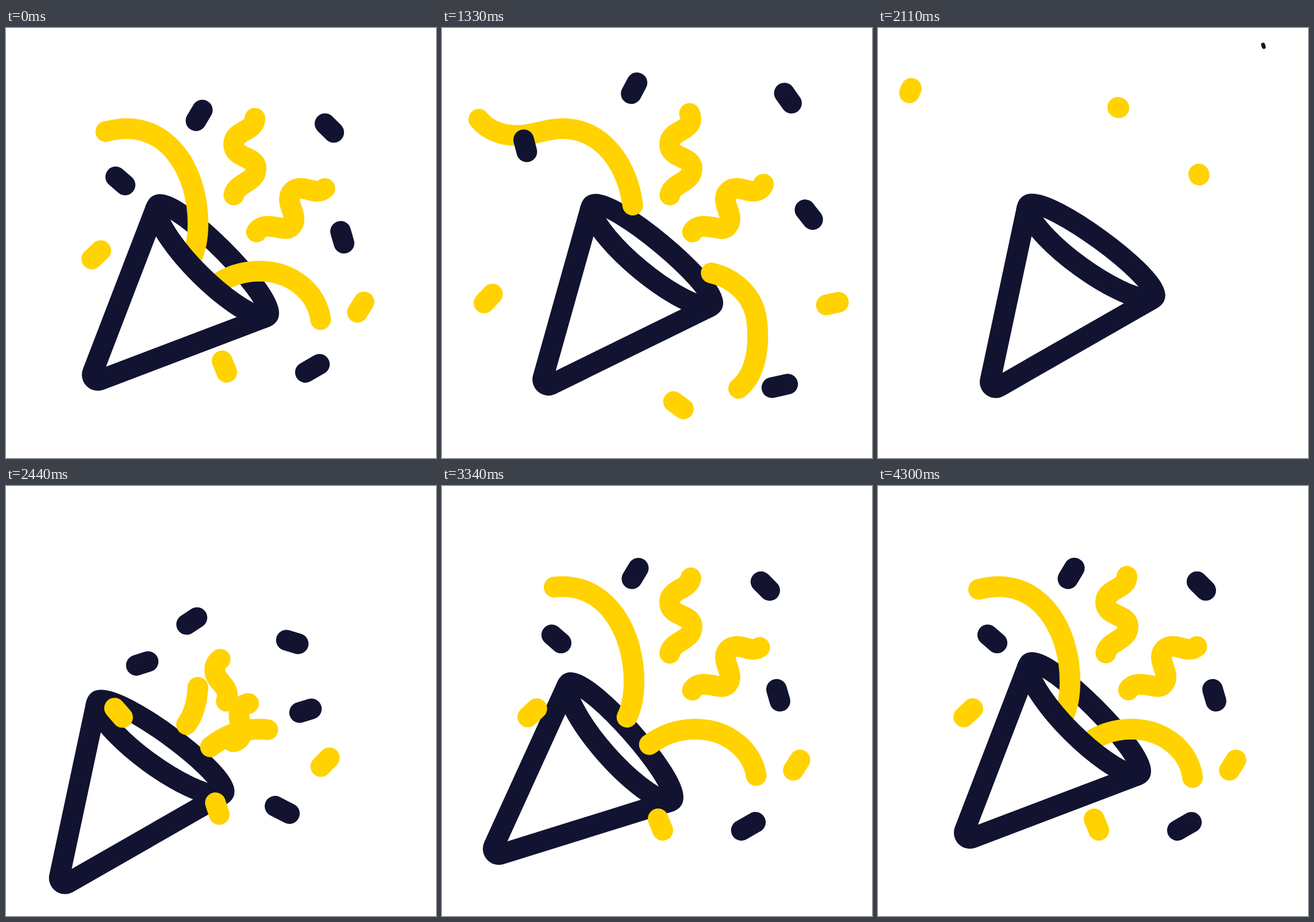
Animation, 748 px wide and 748 px high, one loop 4.36 s. Source, as an HTML page:

```html
<!DOCTYPE html>
<html lang="en">
<head>
<meta charset="utf-8">
<title>Confetti popper</title>
<style>
  html, body { margin: 0; width: 100%; height: 100%; overflow: hidden; background: #fff; }
  svg { display: block; width: 100vw; height: 100vh; }
  path { fill: none; stroke: #121331; stroke-width: 36; stroke-linecap: round; stroke-linejoin: round; }
  .gold { stroke: #ffd200; }
</style>
</head>
<body>
<svg viewBox="0 0 748 748">
  <path class="cone" d="M260 315C262 309 264 307 268 307C308 307 457 456 457 496C457 500 455 502 449 504"/>
  <g id="ribbons"></g>
  <path class="cone" d="M260 315C272 375 389 492 449 504L163.5 612.4A10 10 0 0 1 150.7 599.4Z"/>
  <g id="confetti"></g>
</svg>
<script>
const LOOP = 4360, START = 1000;
const clamp = x => Math.min(1, Math.max(0, x));
const span = (t, from, to) => clamp((t - from) / (to - from));

// Cubic Bezier easing with control points (x1, 0) and (x2, 1)
const bezier = (x1, x2) => x => {
  let lo = 0, hi = 1;
  for (let i = 0; i < 24; i++) {
    const s = (lo + hi) / 2, r = 1 - s;
    if (3 * s * r * r * x1 + 3 * s * s * r * x2 + s ** 3 < x) lo = s; else hi = s;
  }
  return lo * lo * (3 - 2 * lo);
};
const ease = bezier(0.37, 0.49);
const launch = bezier(0.33, 0.3);
const smooth = x => x * x * (3 - 2 * x);
const settle = (t, from, tau) => t < from ? 0 : 1 - Math.exp((from - t) / tau);

// Interpolates [time, value] keys
function track(t, keys) {
  let value = keys[0][1];
  for (let i = 1; i < keys.length; i++) {
    const [t0, v0] = keys[i - 1], [t1, v1] = keys[i];
    if (t >= t0) value = v0 + (v1 - v0) * ease(span(t, t0, t1));
  }
  return value;
}

function addPath(parent, d, gold) {
  const path = document.createElementNS("http://www.w3.org/2000/svg", "path");
  path.setAttribute("d", d);
  if (gold) path.setAttribute("class", "gold");
  return document.getElementById(parent).appendChild(path);
}

// rest: visible part of the path; tail/head: when each end leaves; grow/trail: [begin, tau] on return
const squiggle = {
  rest: [0.237, 0.905], tail: [1380, 2180], head: [1150, 1660], grow: [2355, 215], trail: [2440, 180]
};
const ribbons = [
  { d: "M314 415C328 396 334 370 334 340C334 255 288 175 210 175C180 175 160 187 130 187C85 187 53 160 53 127C53 118 55 110 58 105",
    rest: [0.029, 0.663], tail: [START, 2250], head: [START, 1600], grow: [2362, 355], trail: [2440, 150], from: [0, 0] },
  { d: "M354 455C375 438 402 423 440 423C500 423 541 462 547 506C552 540 549 575 536 602C524 625 503 641 478 641C471 641 464 640 458 637",
    rest: [0.02, 0.56], tail: [START, 2050], head: [START, 1600], grow: [2292, 250], trail: [2400, 150], from: [0, 0] },
  { d: "M416 350C426 322 396 318 396 295C396 268 435 272 435 244C435 222 396 228 396 202C396 178 433 180 433 158C433 148 426 141 417 138",
    from: [-77, 58], ...squiggle },
  { d: "M422 412C440 410 440 392 436 380C428 358 438 345 455 345C470 345 478 349 487 349C496 349 501 340 501 332C501 320 493 310 493 298C493 286 502 279 513 279C524 279 530 284 541 284C553 284 560 276 560 266C560 261 559 257 558 254",
    from: [-65, 77], ...squiggle }
];
for (const r of ribbons) {
  r.el = addPath("ribbons", r.d, true);
  r.el.setAttribute("pathLength", 1);
}

// x, y, angle, then leaving offset and turn, arriving offset and turn, and the time it is gone
const confetti = [
  [336, 152, -59, -5, -130, -8, -30, 194, 30, 1790],
  [562.5, 174, 45, 108, -143, 27, -151, 228, -33, 2130],
  [199, 266, 41, -149, -168, 95, 89, 100, -69, 1950],
  [585, 364, 74, 146, -108, -61, -150, 63, -107, 1900],
  [533, 592, -30, 150, 84, 48, -123, -67, 67, 1800],
  [157, 394.5, -43, -149, 148, -8, 91, 0, 108, 1850, true],
  [617, 485.5, -58, 121, -12, 88, -145, -12, -197, 1850, true],
  [380, 589, 68, 61, 131, -61, -29, -65, -207, 1900, true]
].map(([x, y, angle, ox, oy, oa, ix, iy, ia, gone, gold], i) => {
  const half = i === 4 ? 14 : 10.7;
  return { x, y, angle, out: [ox, oy, oa], back: [ix, iy, ia], gone, gold,
           el: addPath("confetti", `M${-half} 0H${half}`, gold) };
});

const cones = document.querySelectorAll(".cone");
const arrival = t => (1 - span(t, 2110, 3450)) ** 3;

function drawCone(t) {
  const x = track(t, [[START, 0], [1700, 21], [2110, 21], [2600, -101], [4300, 0]]);
  const y = track(t, [[START, 0], [1700, -8], [2110, -8], [2600, 71], [4300, 0]]);
  const turn = track(t, [[START, 0], [1660, -9], [2440, -9], [2710, 5.9], [4300, 0]]);
  for (const c of cones) c.setAttribute("transform", `translate(${x} ${y}) rotate(${turn} 303 461)`);
}

function drawRibbon(r, t) {
  let [a, b] = r.rest, away = 0;
  if (t < 2270) {
    a += (1 - a) * ease(span(t, ...r.tail));
    b += (1 - b) * ease(span(t, ...r.head));
  } else {
    a *= settle(t, ...r.trail);
    b *= settle(t, ...r.grow);
    away = arrival(t);
  }
  r.el.style.display = b - a > 0.002 ? "" : "none";
  r.el.setAttribute("stroke-dasharray", `${Math.max(0, b - a)} 2`);
  r.el.setAttribute("stroke-dashoffset", -a);
  r.el.setAttribute("transform", `translate(${r.from[0] * away} ${r.from[1] * away})`);
}

function drawPiece(p, t) {
  const leaving = t < 2140;
  const [dx, dy, da] = leaving ? p.out : p.back;
  const move = leaving ? launch(span(t, START, p.gold ? 1900 : 2110)) : arrival(t);
  const spin = leaving ? move : 1 - smooth(span(t, 2150, 3350));
  const size = leaving ? 1 - span(t, p.gone - 100, p.gone) : span(t, 2140, 2230);
  p.el.style.display = size ? "" : "none";
  p.el.setAttribute("transform",
    `translate(${p.x + dx * move} ${p.y + dy * move}) rotate(${p.angle + da * spin}) scale(${size})`);
}

function draw(now) {
  const t = now % LOOP;
  drawCone(t);
  ribbons.forEach(r => drawRibbon(r, t));
  confetti.forEach(p => drawPiece(p, t));
}

const begin = performance.now();
function tick() {
  draw(performance.now() - begin);
  requestAnimationFrame(tick);
}
tick();
</script>
</body>
</html>
```
